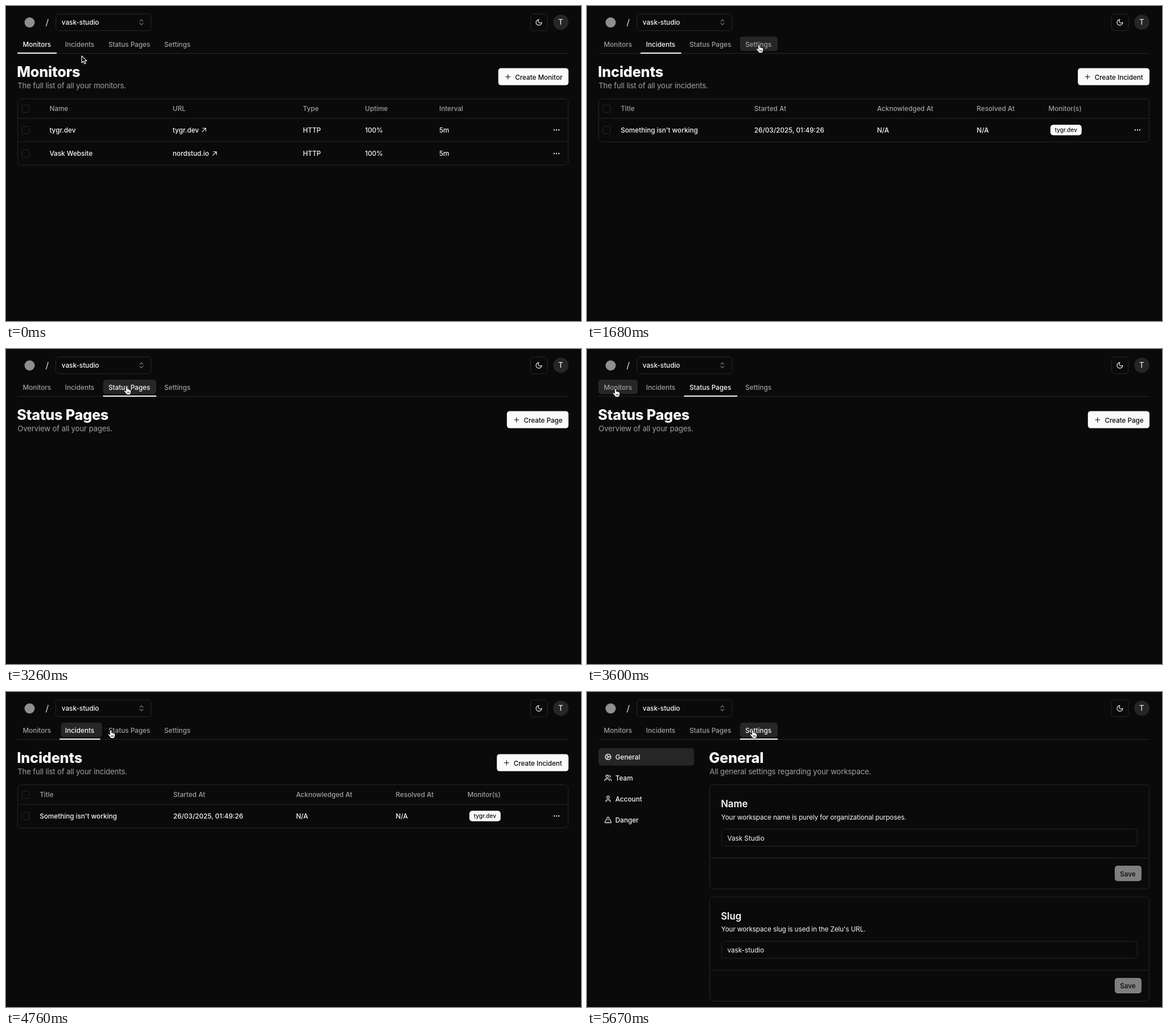
An HTML page for the animation above (5.69 s loop, 1010 px wide and 555 px high).

```html
<!DOCTYPE html>
<html lang="en">
<head>
<meta charset="utf-8">
<title>Monitoring dashboard</title>
<style>
html, body { margin: 0; width: 100%; height: 100%; overflow: hidden; background: #0a0a0a; }
svg { display: block; width: 1010px; height: 555px; }
text { font-family: Inter, sans-serif; font-optical-sizing: none; white-space: pre; }
</style>
</head>
<body>
<svg id="stage" viewBox="0 0 1010 555" xmlns="http://www.w3.org/2000/svg"></svg>
<script>
const LOOP = 5690;
const FG = '#fafafa', MUTED = '#a1a1a1', BG = '#0a0a0a', LINE = '#262626';

// label, left edge, width, text start
const TABS = [
  ['Monitors', 20, 69, 29.6],
  ['Incidents', 94, 71.5, 103.8],
  ['Status Pages', 170.5, 93.5, 179.9],
  ['Settings', 268.7, 66.3, 278]
];

// time, tab
const VISITS = [[0, 0], [820, 1], [1700, 3], [2920, 2], [3920, 0], [4540, 1], [5140, 2], [5500, 3]];
const HOVERS = [[580, 1], [1062, 2], [1180, 3], [1860, 2], [3380, 1], [3450, 0], [4300, 1], [4760, 2], [5330, 3]];

// time, x, y of the pointer tip
const PATH = [
  [0, 133, 87], [200, 183, 120], [500, 183, 120], [700, 130, 70], [980, 130, 70],
  [1100, 260, 71], [1400, 302, 68], [1720, 302, 68], [2080, 216, 66], [3220, 216, 66],
  [3260, 212, 66], [3600, 50, 70], [4230, 50, 70], [4440, 130, 67], [4670, 130, 67],
  [4760, 184, 67], [4900, 214, 67], [5250, 214, 67], [5440, 288, 68], [5670, 291, 67]
];

const clamp = v => Math.max(0, Math.min(1, v));
const mix = (a, b, p) => a + (b - a) * p;
const easeOut = p => 1 - (1 - p) ** 5;
const smooth = p => p * p * (3 - 2 * p);

const text = (x, y, str, { size = 11.72, weight = 500, fill = FG, anchor = 'start', gap = 0, id = '' } = {}) =>
  `<text x="${x}" y="${y}" font-size="${size}" font-weight="${weight}" fill="${fill}" text-anchor="${anchor}"` +
  `${gap ? ` letter-spacing="${gap}"` : ''}${id ? ` id="${id}"` : ''}>${str}</text>`;
const box = (x, y, w, h, r, fill = 'none', stroke = 'none') =>
  `<rect x="${x}" y="${y}" width="${w}" height="${h}" rx="${r}" fill="${fill}" stroke="${stroke}"/>`;
const frame = (x, y, w, h, r = 5) => box(x, y, w, h, r, 'none', LINE);
const rule = (x1, x2, y) => `<path d="M${x1} ${y}H${x2}" stroke="${LINE}"/>`;
const ring = (cx, cy, r) => `M${cx - r} ${cy}a${r} ${r} 0 1 0 ${2 * r} 0a${r} ${r} 0 1 0 ${-2 * r} 0`;
// Icons live on a 24-unit grid
const icon = (cx, cy, d, color = FG, scale = 0.557) =>
  `<path transform="translate(${cx} ${cy}) scale(${scale}) translate(-12 -12)" d="${d}" fill="none" ` +
  `stroke="${color}" stroke-width="2" stroke-linecap="round" stroke-linejoin="round"/>`;

const ICONS = {
  updown: 'M7 15l5 5 5-5M7 9l5-5 5 5',
  moon: 'M12 3a6 6 0 0 0 9 9 9 9 0 1 1-9-9Z',
  plus: 'M5 12h14M12 5v14',
  out: 'M6 18L18 6M8 6h10v10',
  cog: ring(12, 12, 8) + ring(12, 12, 2) +
    'M12 2v2M12 22v-2M17 20.66l-1-1.73M11 10.27L7 3.34M20.66 17l-1.73-1M3.34 7l1.73 1M14 12h8M2 12h2' +
    'M20.66 7l-1.73 1M3.34 17l1.73-1M17 3.34l-1 1.73M11 13.73l-4 6.93',
  users: 'M16 21v-2a4 4 0 0 0-4-4H6a4 4 0 0 0-4 4v2' + ring(9, 7, 4) +
    'M22 21v-2a4 4 0 0 0-3-3.87M16 3.13a4 4 0 0 1 0 7.75',
  user: 'M19 21v-2a4 4 0 0 0-4-4H9a4 4 0 0 0-4 4v2' + ring(12, 7, 4),
  alert: 'M21.73 18l-8-14a2 2 0 0 0-3.48 0l-8 14A2 2 0 0 0 4 21h16a2 2 0 0 0 1.73-3M12 9v4M12 17h.01'
};

const heading = (x, title, sub) =>
  text(x - 1.2, 125, title, { size: 25.2, weight: 800, gap: -0.2 }) +
  text(x - 0.3, 144.7, sub, { size: 13.2, weight: 400, fill: MUTED, gap: -0.14 });

const createButton = (x, label) =>
  box(x, 109.4, 988 - x, 30.2, 5, FG) + icon(x + 17, 124.8, ICONS.plus, BG) +
  text(x + 29.6, 129.6, label, { fill: BG, size: 11.65 });

const checkbox = y => frame(28, y - 6.5, 13, 13, 3);
const dots = (y, id) => `<g id="${id}" fill="${FG}">` +
  [962.9, 967, 971.1].map(x => `<circle cx="${x}" cy="${y}" r="1.15"/>`).join('') + '</g>';
const spinner = (y, id) => `<g id="${id}" fill="none" stroke-width="1.4">` +
  `<circle cx="967" cy="${y}" r="5.4" stroke="#555"/>` +
  `<path d="M967 ${y - 5.4}a5.4 5.4 0 0 1 5.4 5.4" stroke="${FG}"/></g>`;

const table = (height, cols, heads) =>
  frame(20.5, 163.5, 967, height, 6) + rule(21, 987, 198) + checkbox(181) +
  heads.map((h, i) => text(cols[i], 185.2, h, { fill: MUTED })).join('');
const cells = (y, cols, values) =>
  checkbox(y) + values.map((v, i) => text(cols[i], y + 4.2, v)).join('');

function monitorsPage() {
  const cols = [76.4, 292.8, 521.6, 630.6, 761];
  const row = (y, i, name, url, arrowX) =>
    cells(y, cols, [name, url, 'HTTP', '100%', '5m']) + icon(arrowX, y, ICONS.out, FG, 0.54) +
    dots(y, 'dots' + i) + spinner(y, 'spin' + i);
  return heading(20.5, 'Monitors', 'The full list of all your monitors.') +
    createButton(864.7, 'Create Monitor') +
    table(117, cols, ['Name', 'URL', 'Type', 'Uptime', 'Interval']) +
    row(218.5, 0, 'tygr.dev', 'tygr.dev', 347.7) + rule(21, 987, 239) +
    row(260, 1, 'Vask Website', 'nordstud.io', 366.4);
}

function incidentsPage() {
  const cols = [59.2, 293.8, 509.4, 684.6, 810.5];
  return heading(20.5, 'Incidents', 'The full list of all your incidents.') +
    createButton(862.2, 'Create Incident') +
    table(76, cols, ['Title', 'Started At', 'Acknowledged At', 'Resolved At', 'Monitor(s)']) +
    cells(218.5, cols, ["Something isn't working", '26/03/2025, 01:49:26', 'N/A', 'N/A']) +
    box(814, 209.2, 54.8, 18.6, 5, FG) +
    text(841.3, 222.1, 'tygr.dev', { size: 10, weight: 500, fill: BG, anchor: 'middle' }) +
    dots(218.5, 'dots2');
}

const statusPage = () =>
  heading(20.5, 'Status Pages', 'Overview of all your pages.') + createButton(879.8, 'Create Page');

function settingsPage() {
  const side = [['General', 'cog'], ['Team', 'users'], ['Account', 'user'], ['Danger', 'alert']];
  const card = (y, title, sub, value) =>
    frame(215.5, y, 772, 183.5, 6) +
    text(235.2, y + 39.3, title, { size: 16.7, weight: 600 }) +
    text(235.8, y + 61, sub, { weight: 400, gap: -0.13 }) +
    frame(236.5, y + 78, 730, 30) +
    text(246.4, y + 98, value, { weight: 400 }) +
    rule(216, 987, y + 129) +
    box(927, y + 142.5, 47, 27.2, 5, '#7f7f7f') +
    text(950, y + 161.2, 'Save', { fill: BG, anchor: 'middle' });
  return box(20, 99, 168, 30.5, 5, LINE) +
    side.map(([label, name], i) =>
      icon(37, 114.4 + i * 37, ICONS[name]) + text(49.8, 119.3 + i * 37, label)).join('') +
    heading(215.5, 'General', 'All general settings regarding your workspace.') +
    card(163.5, 'Name', 'Your workspace name is purely for organizational purposes.', 'Vask Studio') +
    card(361.2, 'Slug', "Your workspace slug is used in the Zelu's URL.", 'vask-studio');
}

const header =
  `<circle cx="41.5" cy="29" r="9" fill="#8f8f8f"/>` +
  `<path d="M70.3 36L74.2 22.8" stroke="#d4d4d4" stroke-width="1.3"/>` +
  frame(87.5, 14, 167.5, 29.5) + text(97.8, 33.2, 'vask-studio') +
  icon(237.8, 28.6, ICONS.updown, '#858585') +
  frame(921.5, 14, 29.5, 29.5) + icon(936, 28.9, ICONS.moon) +
  `<circle cx="974.6" cy="28.6" r="13.4" fill="${LINE}"/>` +
  text(974.3, 33.4, 'T', { size: 13.4, weight: 400, anchor: 'middle' });

const hand =
  `<g id="hand" stroke="#000" stroke-width=".8" stroke-linejoin="round">` +
  `<path fill="#fff" d="M-1.4 1.3a1.4 1.4 0 0 1 2.8 0V4.8Q2.9 4.1 3.6 5.3Q5.1 4.8 5.7 6.1Q7.4 5.7 7.6 7.3V10` +
  `Q7.4 12 6.3 13V14.6H-.3V13.4Q-2 11.5-4.4 8.5Q-5.2 6.8-3.8 6.7Q-2.6 6.7-1.4 8.4Z"/>` +
  `<path fill="none" d="M1.2 9.2V12M3 9.2V12M4.8 9.2V12"/></g>`;
const arrow =
  `<path id="arrow" fill="#000" stroke="#fff" stroke-width="1.1" stroke-linejoin="round" ` +
  `d="M0 .8V13L2.8 10.4L4.8 15L7 14.1L5 9.6H8.8Z"/>`;

document.getElementById('stage').innerHTML =
  box(0, 0, 1010, 555, 0, BG) + header + rule(20, 988, 83.5) +
  `<rect id="glow" y="54" height="25.3" rx="5" fill="${LINE}"/>` +
  TABS.map(([label, , , x], i) => text(x, 71.6, label, { id: 'tab' + i })).join('') +
  `<rect id="bar" y="82" height="2" fill="${FG}"/>` +
  [monitorsPage, incidentsPage, statusPage, settingsPage]
    .map((page, i) => `<g id="page${i}">${page()}</g>`).join('') +
  `<g id="pointer">${arrow}${hand}</g>`;

const $ = id => document.getElementById(id);
const set = (id, attrs) => Object.entries(attrs).forEach(([k, v]) => $(id).setAttribute(k, v));
const show = (id, on) => set(id, { visibility: on ? 'inherit' : 'hidden' });

// Slides a tab-sized box through a list of [time, tab] stops
function slide(stops, t) {
  let [, x, width] = TABS[stops[0][1]];
  for (const [at, tab] of stops) {
    const p = easeOut(clamp((t - at) / 150));
    x = mix(x, TABS[tab][1], p);
    width = mix(width, TABS[tab][2], p);
  }
  return { x, width };
}

function pointerAt(t) {
  let i = 0;
  while (i < PATH.length - 2 && t >= PATH[i + 1][0]) i++;
  const [t0, x0, y0] = PATH[i], [t1, x1, y1] = PATH[i + 1];
  const p = smooth(clamp((t - t0) / (t1 - t0)));
  return [mix(x0, x1, p), mix(y0, y1, p)];
}

function render(t) {
  const current = VISITS.filter(v => v[0] <= t).pop()[1];
  TABS.forEach((_, i) => {
    const on = i === current;
    set('page' + i, { display: on ? 'inline' : 'none' });
    set('tab' + i, { fill: on ? FG : MUTED });
  });
  set('bar', slide(VISITS, t));
  set('glow', { ...slide(HOVERS, t), opacity: clamp((t - HOVERS[0][0]) / 120) });

  // Rows show a spinner while their data reloads
  [[218.5, 4080], [260, 4220]].forEach(([y, ready], i) => {
    const busy = t >= 3920 && t < ready;
    show('spin' + i, busy);
    show('dots' + i, !busy);
    set('spin' + i, { transform: `rotate(${(t - 4140) * 0.36} 967 ${y})` });
  });

  const [x, y] = pointerAt(t);
  set('pointer', { transform: `translate(${x} ${y})` });
  show('hand', y < 80);
  show('arrow', y >= 80);
}

const start = performance.now();
function tick() {
  render((performance.now() - start) % LOOP);
  requestAnimationFrame(tick);
}
tick();
</script>
</body>
</html>
```
